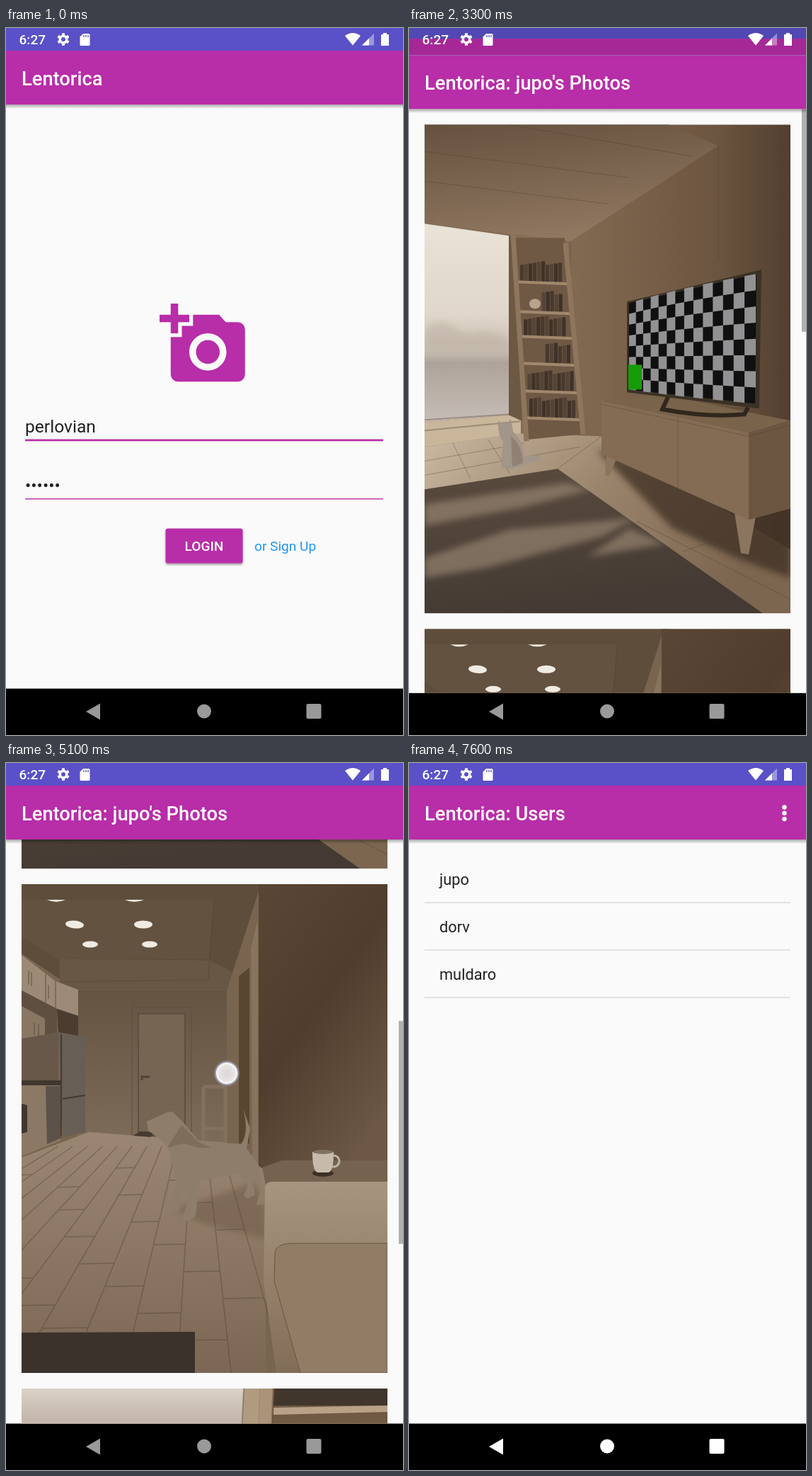
Recreate the animation shown at these times as an HTML page. Size 561 by 998 pixels, loop 8 s.

```html
<!DOCTYPE html>
<html lang="en">
<head>
<meta charset="utf-8">
<title>Photo sharing app</title>
<style>
  html, body { margin: 0; width: 100%; height: 100%; overflow: hidden; background: #000; }
  #stage { display: block; width: 100vw; height: 100vh; font-family: Roboto, sans-serif; }
  .title { font-size: 27.3px; font-weight: 500; fill: #fff; }
  .row { font-size: 21.8px; fill: #212121; }
  .field { font-size: 24.6px; fill: #212121; }
  .small { font-size: 19.1px; }
  .medium { font-weight: 500; fill: #fff; }
  .accent { fill: #b82da8; }
  .line { fill: none; stroke: #49382a; stroke-opacity: .35; }
</style>
</head>
<body>
<svg id="stage" viewBox="0 0 561 998">
  <defs>
    <linearGradient id="shade" x2="0" y2="1"><stop stop-opacity=".32"/><stop offset="1" stop-opacity="0"/></linearGradient>
    <linearGradient id="ceiling" x2=".3" y2="1"><stop stop-color="#66513f"/><stop offset="1" stop-color="#8f7760"/></linearGradient>
    <linearGradient id="wall"><stop offset=".35" stop-color="#856c54"/><stop offset=".8" stop-color="#6c5540"/><stop offset="1" stop-color="#523f2f"/></linearGradient>
    <linearGradient id="floor" x2="1" y2=".5"><stop stop-color="#cbb9a1"/><stop offset=".5" stop-color="#9a846c"/><stop offset="1" stop-color="#7c6650"/></linearGradient>
    <linearGradient id="rug" x2=".3" y2="1"><stop stop-color="#5a4b3e"/><stop offset="1" stop-color="#443a33"/></linearGradient>
    <linearGradient id="glass" x2="0" y2="1">
      <stop stop-color="#e9e2d6"/><stop offset=".45" stop-color="#e0d7ca"/><stop offset=".64" stop-color="#cbc0b3"/>
      <stop offset=".7" stop-color="#aea39a"/><stop offset="1" stop-color="#c6bdb6"/>
    </linearGradient>
    <linearGradient id="backWall" x2="0" y2="1"><stop stop-color="#655442"/><stop offset="1" stop-color="#7e6c5a"/></linearGradient>
    <linearGradient id="darkWall" x2=".6" y2="1"><stop stop-color="#5a4635"/><stop offset=".5" stop-color="#513d2d"/><stop offset="1" stop-color="#6c5845"/></linearGradient>
    <linearGradient id="hallFloor" x2="0" y2="1"><stop stop-color="#9a8672"/><stop offset="1" stop-color="#7c6754"/></linearGradient>
    <linearGradient id="sofa" x2="0" y2="1"><stop stop-color="#a8957f"/><stop offset="1" stop-color="#826d58"/></linearGradient>
    <linearGradient id="wideGlass" x2="0" y2="1">
      <stop stop-color="#dcd2c7"/><stop offset=".22" stop-color="#c3b6ac"/><stop offset=".45" stop-color="#e6ddce"/>
      <stop offset=".65" stop-color="#d8cec3"/><stop offset="1" stop-color="#aaa2a0"/>
    </linearGradient>
    <linearGradient id="shelfWall" x2="0" y2="1"><stop stop-color="#6b553f"/><stop offset="1" stop-color="#8f785d"/></linearGradient>
    <radialGradient id="dot">
      <stop stop-color="#dcd7d6"/><stop offset=".6" stop-color="#e8e5e5"/><stop offset=".76" stop-color="#fbfafc"/>
      <stop offset=".84" stop-color="#a3a2bc" stop-opacity=".8"/><stop offset="1" stop-color="#9090b0" stop-opacity="0"/>
    </radialGradient>
    <filter id="soft"><feGaussianBlur stdDeviation="5"/></filter>
    <filter id="raised" x="-10%" y="-10%" width="120%" height="140%"><feDropShadow dx="0" dy="2" stdDeviation="1.6" flood-opacity=".4"/></filter>
    <clipPath id="reveal"><rect id="revealRect" width="561" height="998"/></clipPath>
    <g id="chrome">
      <rect width="561" height="998" fill="#fafafa"/>
      <rect y="932.5" width="561" height="120"/>
    </g>
    <g id="bar">
      <rect y="108" width="561" height="6" fill="url(#shade)"/>
      <rect width="561" height="32.5" fill="#5a50c8"/>
      <rect class="accent" y="32" width="561" height="76"/>
    </g>
  </defs>

  <rect width="561" height="998"/>

  <g id="login">
    <use href="#chrome"/><use href="#bar"/>
    <text class="title" x="22" y="81">Lentorica</text>
    <path class="accent" transform="translate(217 383.8) scale(5.25)" d="M3 4V1h2v3h3v2H5v3H3V6H0V4h3zm3 6V7h3V4h7l1.83 2H21c1.1 0 2 .9 2 2v12c0 1.1-.9 2-2 2H5c-1.1 0-2-.9-2-2V10h3zm7 9c2.76 0 5-2.24 5-5s-2.24-5-5-5-5 2.24-5 5 2.24 5 5 5zm-3.2-5c0 1.77 1.43 3.2 3.2 3.2s3.2-1.43 3.2-3.2-1.43-3.2-3.2-3.2-3.2 1.43-3.2 3.2z"/>
    <text class="field" x="27" y="571">perlovian</text>
    <rect id="cursor" class="accent" x="132" y="546" width="2.7" height="32"/>
    <rect class="accent" x="27" y="580.5" width="506" height="2.7"/>
    <text class="field" x="27" y="654">••••••</text>
    <rect class="accent" x="27" y="664" width="506" height="1.4"/>
    <rect class="accent" x="225.5" y="706.5" width="109" height="49" rx="3" filter="url(#raised)"/>
    <rect id="buttonPress" x="225.5" y="706.5" width="109" height="49" rx="3" fill="#fff" opacity=".22"/>
    <text class="small medium" x="280" y="738" text-anchor="middle">LOGIN</text>
    <text class="small" x="351" y="738" fill="#2196f3">or Sign Up</text>
  </g>

  <g id="users">
    <use href="#chrome"/><use href="#bar"/>
    <text class="title" x="22" y="81">Lentorica: Users</text>
    <g fill="#fff"><circle cx="530.5" cy="62.5" r="3.2"/><circle cx="530.5" cy="70.8" r="3.2"/><circle cx="530.5" cy="79" r="3.2"/></g>
    <rect id="rowPress" x="22" y="130" width="517" height="67" opacity=".12"/>
    <text class="row" x="43" y="172">jupo</text>
    <text class="row" x="43" y="239">dorv</text>
    <text class="row" x="43" y="306">muldaro</text>
    <path d="M22 197H539M22 264H539M22 331H539" stroke="#dadada" stroke-width="1.5"/>
  </g>

  <g id="photos">
    <use href="#chrome"/>
    <svg y="108" width="561" height="824.5">
      <g id="feed">
        <!-- living room -->
        <svg x="22" y="22" width="517" height="690">
          <rect width="517" height="690" fill="url(#wall)"/>
          <path d="M0 0H345L415 30 206 165 0 139Z" fill="url(#ceiling)"/>
          <path class="line" d="M415 30V190M206 165V440M0 38 290 75M0 80 260 112M120 0 380 45"/>
          <path d="M0 140 119 157V410L0 420Z" fill="url(#glass)"/>
          <path d="M0 290Q20 270 40 285T80 290L119 300V322H0Z" fill="#b9ada0" opacity=".5" filter="url(#soft)"/>
          <path d="M119 157 126 156 138 418 119 410Z" fill="#6d5843"/>
          <path d="M0 420 119 410 136 418V436L0 455Z" fill="#c9b69b"/>
          <path class="line" d="M0 417 120 409M0 432 135 419" stroke-width="2"/>
          <path d="M0 455 135 436 250 440 517 600V690H0Z" fill="url(#floor)"/>
          <path class="line" d="M0 475 140 450M0 495 220 455M40 450 65 500M90 445 120 492M188 486 250 440M300 560 517 670M365 603 400 590 458 607"/>
          <path d="M0 515 188 486 478 690H0Z" fill="url(#rug)"/>
          <path d="M0 536 200 506 236 515 140 540 0 566ZM0 612 120 572 300 555 250 582 90 625 0 640ZM230 610 290 570 340 592Z" fill="#a8957f" opacity=".55" filter="url(#soft)"/>
          <path d="M125 160H198L223 437 143 445Z" fill="#6f5945"/>
          <g id="shelves"></g>
          <path d="M125 155 144 447M199 167 224 437" stroke="#8d765c" stroke-width="7"/>
          <ellipse cx="156" cy="253" rx="8" ry="7" fill="#b7a48c"/>
          <path d="M104 418 109 422H116L122 416 125 433Q141 449 140 468L162 467 164 474 143 480Q120 490 108 483L111 448Q103 438 104 418Z" fill="#a2958a"/>
          <path d="M122 440Q138 452 139 478L124 483Z" fill="#7d6d5d" opacity=".5"/>
          <path d="M242 458 458 540 517 530V640L440 612 350 570Z" fill="#3d2e20" opacity=".75" filter="url(#soft)"/>
          <path d="M257 467 271 472 261 496 255 495ZM438 548 468 553 458 607 447 605Z" fill="#8b755e"/>
          <path d="M250 390 335 381 517 418 458 435Z" fill="#7a634b"/>
          <path d="M250 390 458 435V558L250 465Z" fill="#846c54"/>
          <path d="M458 435 517 418V542L458 558Z" fill="#6c5641"/>
          <path class="line" d="M358 412V513M250 395 458 440 517 424"/>
          <path d="M346 380 336 402Q400 414 452 409L457 399" fill="none" stroke="#30271e" stroke-width="6"/>
          <path d="M286 250 476 205 473 401 286 378Z" fill="#3b3226"/>
          <path d="M289 252 469 211 467 394 288 374Z" fill="#101010"/>
          <path id="checks" fill="#929294"/>
          <path d="M288 339H307V374H288Z" fill="#159c08"/>
        </svg>

        <!-- hallway -->
        <svg x="22" y="734" width="517" height="690">
          <rect width="517" height="690" fill="#78654f"/>
          <path d="M0 0H345L290 150H78L0 98Z" fill="#5f4d3c"/>
          <path d="M0 22H272L264 107H54L0 75Z" fill="#645241"/>
          <path d="M54 104 264 107 300 125 290 152H78L54 138Z" fill="#695745"/>
          <path class="line" d="M272 22 264 135 54 138M54 105 264 107M78 152H290"/>
          <path d="M36 22H62Q49 28 36 22ZM146 22H173Q159 28 146 22Z" fill="#efe9df"/>
          <g fill="#f0ebe2"><ellipse cx="75" cy="57" rx="13" ry="5.5" transform="rotate(5 75 57)"/><ellipse cx="172" cy="57" rx="13" ry="5.5"/><ellipse cx="97" cy="85" rx="11" ry="4.5"/><ellipse cx="181" cy="85" rx="11" ry="4.5"/></g>
          <path d="M78 152H290V370H78Z" fill="url(#backWall)"/>
          <path d="M156 174H240V360H156Z" fill="none" stroke="#5f4e3c"/>
          <path d="M165 183H231V355H165Z" fill="#776553" stroke="#58483a" stroke-width="1.5"/>
          <path d="M170 270V277M170 272H181" stroke="#4f4335" stroke-width="3"/>
          <path d="M290 150 335 10V410L290 366Z" fill="#78644f"/>
          <path d="M307 130 322 118V366H307Z" fill="#594630"/>
          <path d="M324 90 334 50V400H326Z" fill="#88745e"/>
          <path d="M335 0H517V425H335Z" fill="url(#darkWall)"/>
          <path d="M0 100 48 137 80 149V186L50 176 0 150Z" fill="#9c8a76"/>
          <path d="M0 150 50 176V212H0Z" fill="#5f4f40"/>
          <path d="M0 172 33 190V224L0 218Z" fill="#897764"/>
          <path d="M50 176 80 186V214L52 209Z" fill="#4a3d30"/>
          <path d="M0 218 52 209V280H0Z" fill="#67584a"/>
          <path class="line" d="M34 127V168M48 137V176M10 122V142M14 124V144M38 142V162M18 196V213M24 198V215" stroke-width="2"/>
          <path d="M0 284H55V362L0 384Z" fill="#8b7965"/>
          <path d="M0 277H57V284H0ZM0 310 8 312V350L0 352Z" fill="#40372f"/>
          <path d="M34 285H57V358L36 367Z" fill="#5c5249"/>
          <path d="M52 209 90 217V350L59 357Z" fill="#675e55"/>
          <path d="M56 212V355M58 303 90 298" stroke="#433a33" stroke-width="2"/>
          <path d="M0 386 95 350 290 365 345 405V690H0Z" fill="url(#hallFloor)"/>
          <path id="planks" class="line" stroke-width="1.5"/>
          <path d="M157 355 168 349 190 350 182 357Z" fill="#473a2e"/>
          <path d="M257 286H288V364M257 286V364M257 345H288" fill="none" stroke="#84715d" stroke-width="5"/>
          <path d="M215 460 330 420 345 455 345 500 260 480Z" fill="#54412f" opacity=".3" filter="url(#soft)"/>
          <path d="M177 335 206 322 213 321 229 337 250 362 310 367Q322 352 313 317L323 345 318 373 334 395 344 440V452L332 453 338 430 326 414 330 438 320 444 314 440 320 425 305 409 252 418 246 468 236 476 226 473 234 452 230 428 222 461 210 465 213 456 218 418 207 371 193 358 179 348Z" fill="#8e7d6a"/>
          <path d="M206 372 226 340 250 364 268 372 250 372 228 366Z" fill="#6b5947" opacity=".45"/>
          <path d="M0 633 245 632V690H0Z" fill="#3b322c"/>
          <path d="M340 400 368 390H517V425H345Z" fill="#75624f"/>
          <path d="M344 430Q344 420 354 420H517V690H360L342 560Z" fill="url(#sofa)"/>
          <path d="M358 520Q360 508 380 507H517V690H394L357 560Z" fill="#917c66" stroke="#695542"/>
          <ellipse cx="426" cy="408" rx="15" ry="5" fill="#3c3026"/>
          <circle cx="441" cy="391" r="8" fill="none" stroke="#bfb3a4" stroke-width="3"/>
          <path d="M411 378H441Q441 405 434 407H418Q411 405 411 378Z" fill="#c6baab"/>
          <ellipse cx="426" cy="378" rx="14" ry="3" fill="#817363"/>
        </svg>

        <!-- window corner -->
        <svg x="22" y="1446" width="517" height="690">
          <rect width="517" height="690" fill="#9d866b"/>
          <path d="M0 0H314L305 190 0 198Z" fill="url(#wideGlass)"/>
          <path d="M314 0H336L330 210 305 190Z" fill="#b09b80"/>
          <path d="M0 198 305 190 330 200V208L0 217Z" fill="#cbbba0"/>
          <path class="line" d="M314 0 305 190 0 198M0 206 328 197" stroke-width="2"/>
          <path d="M0 214 330 205V210L0 219Z" fill="#8d775d"/>
          <path d="M0 219 330 210V224L0 236Z" fill="#dfd0b7"/>
          <path d="M0 236 330 224V260L0 273Z" fill="#b19a7c"/>
          <path d="M0 273 517 252V690H0Z" fill="url(#floor)"/>
          <path class="line" d="M0 330 517 300M0 410 517 370M0 510 517 460M60 270 30 330M160 266 140 322M260 262 250 316M90 325 50 406M330 311 340 384"/>
          <path d="M0 560 517 510V690H0Z" fill="url(#rug)"/>
          <path d="M350 0H517V258L346 285Z" fill="url(#shelfWall)"/>
          <path d="M358 0H517V24H356Z" fill="#40362c"/>
          <path d="M356 27 517 24V33L356 37ZM351 121 440 114 517 126V138L352 151ZM349 238 517 220V236L349 246Z" fill="#b8a187"/>
          <g id="bigBooks"></g>
          <path d="M337 0H356L344 292H328Z" fill="#aa9378"/>
          <path class="line" d="M356 0 344 292" stroke-width="3"/>
        </svg>
      </g>
      <rect id="scrollbar" x="555" width="6" height="314.6" fill="#b0b0b0"/>
    </svg>
    <use href="#bar"/>
    <text class="title" x="22" y="81">Lentorica: jupo's Photos</text>
  </g>

  <!-- system icons -->
  <g fill="#fff">
    <text class="small medium" x="18.5" y="23">6:27</text>
    <circle cx="81" cy="16" r="4.8" fill="none" stroke="#fff" stroke-width="3.6"/>
    <circle cx="81" cy="16" r="7.2" fill="none" stroke="#fff" stroke-width="3" pathLength="12" stroke-dasharray="1" stroke-dashoffset="1.5"/>
    <path d="M109 8H117Q118.5 8 118.5 9.5V23.5Q118.5 25 117 25H106Q104.5 25 104.5 23.5V12.5Z"/>
    <path d="M110 10V13M113 10V13M116 10V13" stroke="#5a50c8" stroke-width="1.3"/>
    <path d="M479 11Q490 3 501 11L490 24.5Z"/>
    <path d="M520 7.5V24.5H503Z" opacity=".4"/><path d="M513 14.5V24.5H503Z"/>
    <path d="M533 7H538V9H541V25H530V9H533Z"/>
  </g>
  <g id="navIcons">
    <path d="M113 965 133 953.5V976.5Z"/>
    <circle cx="280" cy="964.5" r="10"/>
    <rect x="424.5" y="954" width="21" height="21" rx="2"/>
  </g>
  <circle id="touch" r="19" fill="url(#dot)"/>
</svg>

<script>
const $ = id => document.getElementById(id);
const mix = (a, b, k) => a + (b - a) * k;
const clamp = k => Math.max(0, Math.min(1, k));
const show = (id, on) => $(id).style.display = on ? '' : 'none';

// Piecewise linear track of [time, value] pairs.
function track(keys, t) {
  const i = keys.findIndex(key => key[0] > t);
  if (i < 0) return keys.at(-1)[1];
  if (!i) return keys[0][1];
  const [[t0, a], [t1, b]] = [keys[i - 1], keys[i]];
  return mix(a, b, (t - t0) / (t1 - t0));
}

// y at x on a cubic curve whose x coordinate rises steadily.
function bezier(x, xs, ys) {
  const at = ([a, b, c, d], s) =>
    a * (1 - s) ** 3 + 3 * b * s * (1 - s) ** 2 + 3 * c * s * s * (1 - s) + d * s ** 3;
  let low = 0, high = 1;
  for (let i = 0; i < 24; i++) {
    const mid = (low + high) / 2;
    if (at(xs, mid) < x) low = mid; else high = mid;
  }
  return at(ys, low);
}
const slideEase = x => bezier(x, [0, .4, .2, 1], [0, 0, 1, 1]);
const revealEase = x => x < 1 / 6
  ? bezier(x, [0, .05, .1333, .1667], [0, 0, .06, .4])
  : bezier(x, [.1667, .2083, .25, 1], [.4, .82, 1, 1]);

function buildDetails() {
  // Columns widen towards the near side of the tilted screen.
  const corner = (u, v) =>
    `${mix(289, 468, u * (.74 + .26 * u))} ${mix(mix(252, 211, u), mix(374, 394, u), v)}`;
  const cols = 14, rows = 8;
  let checks = '';
  for (let c = 0; c < cols; c++) for (let r = (c + 1) % 2; r < rows; r += 2) {
    const [u, w, v, z] = [c / cols, (c + 1) / cols, r / rows, (r + 1) / rows];
    checks += `M${corner(u, v)}L${corner(w, v)} ${corner(w, z)} ${corner(u, z)}Z`;
  }
  $('checks').setAttribute('d', checks);

  const book = (x, y, w, h, fill) => `<rect x="${x}" y="${y}" width="${w}" height="${h}" fill="${fill}"/>`;
  let shelves = '';
  [222, 264, 299, 337, 376, 414].forEach((y, row) => {
    const left = 129 + row * 2.6, right = 204 + row * 4;
    const first = row === 1 || row === 3 ? left + 34 : left + 6;
    for (let x = first, i = 0; x < right - 14; x += 6, i++) {
      const h = 24 + (i * 7 + row * 3) % 6;
      shelves += book(x, y - h, 5.2, h, ['#48392d', '#544336', '#3f3228'][(i + row) % 3]);
    }
    shelves += `<path d="M${left} ${y}L${right} ${y + 3}" stroke="#a1886c" stroke-width="4"/>`;
  });
  $('shelves').innerHTML = shelves;

  let big = '';
  for (let i = 0; i < 6; i++)
    big += `<g transform="translate(${426 + i * 17} 50) skewX(-9)">${book(0, i % 3 * 3, 15, 82, ['#5c5146', '#847666', '#6d6051'][i % 3])}</g>`;
  for (let i = 0; i < 11; i++)
    big += `<g transform="translate(${359 + i * 14} 149) skewX(-5)">${book(0, i * 5 % 8, 12.5, 84 - i * 1.5 - i * 5 % 8, ['#84705b', '#92806c', '#716050'][i % 3])}</g>`;
  $('bigBooks').innerHTML = big;

  // Floorboards fan out from a distant point, with staggered end joints.
  const seam = (i, y) => mix(248, 296 - 76 * i, (y - 248) / 442);
  let planks = '';
  for (let i = -1; i < 11; i++) {
    planks += `M${seam(i, 370)} 370L${seam(i, 690)} 690`;
    for (let k = 0; k < 3; k++) {
      const y = 390 + (k * 97 + (i + 1) * 59) % 285;
      planks += `M${seam(i, y)} ${y}L${seam(i + 1, y)} ${y + 1}`;
    }
  }
  $('planks').setAttribute('d', planks);
}

const LOOP = 8000, STEP = 100, SLIDE = 425;
const transitions = [
  { start: 1480, upper: 'users', lower: 'login', opening: true },
  { start: 3060, upper: 'photos', lower: 'users', opening: true },
  { start: 7080, upper: 'photos', lower: 'users', opening: false },
];
const scrollKeys = [[4000, 0], [4400, 253], [4600, 390], [4800, 462], [4900, 490], [5100, 671],
  [5300, 808], [5500, 876], [5700, 909], [5800, 914], [6000, 914], [6200, 1110], [6350, 1265], [6500, 1334]];
const touches = [
  { from: 900, to: 1200, x: 290, y: [[0, 733]] },
  { from: 2600, to: 2900, x: 290, y: [[0, 165]] },
  { from: 4000, to: 4600, x: 315, y: [[4000, 640], [4400, 374], [4600, 237]] },
  { from: 4900, to: 5300, x: 312, y: [[4900, 632], [5100, 438], [5300, 301]] },
  { from: 6000, to: 6300, x: 312, y: [[6000, 640], [6300, 350]] },
  { from: 6800, to: 7000, x: 123, y: [[0, 965]] },
];

function place(id, y, opacity, clipped) {
  const win = $(id);
  show(id, true);
  win.setAttribute('transform', `translate(0 ${y})`);
  win.setAttribute('opacity', opacity);
  if (clipped) win.setAttribute('clip-path', 'url(#reveal)');
  else win.removeAttribute('clip-path');
}

function drawWindows(t) {
  for (const id of ['login', 'users', 'photos']) show(id, false);
  const current = transitions.findLast(tr => t >= tr.start);
  if (!current) return place('login', 0, 1);
  const { start, upper, lower, opening } = current;
  const p = (t - start) / SLIDE;
  if (p >= 1) return place(opening ? upper : lower, 0, 1);
  const directed = k => opening ? k : 1 - k;
  const slide = directed(slideEase(p));
  $('revealRect').setAttribute('y', 957 * (1 - directed(revealEase(p))));
  place(lower, -20 * slide, 1 - .1 * directed(clamp(p * 3.6)));
  place(upper, 41 * (1 - slide), 1, true);
}

function render(t) {
  drawWindows(t);
  show('cursor', t >= 400 && t < 900);
  show('buttonPress', t >= 900 && t < 1300);
  show('rowPress', t >= 2600 && t < 3100);

  const scroll = track(scrollKeys, t);
  $('feed').setAttribute('transform', `translate(0 ${-scroll})`);
  $('scrollbar').setAttribute('y', scroll * 824 / 2158);
  $('scrollbar').setAttribute('opacity', 1 - clamp((t - 6750) / 250));
  $('navIcons').setAttribute('fill', t < 6800 ? '#999' : '#fff');

  const touch = touches.find(({ from, to }) => t >= from && t < to);
  show('touch', touch);
  if (touch) {
    $('touch').setAttribute('cx', touch.x);
    $('touch').setAttribute('cy', track(touch.y, t));
  }
}

buildDetails();
const origin = performance.now();
function tick() {
  // The picture advances ten times a second.
  const t = (performance.now() - origin) % LOOP;
  render(Math.floor(t / STEP) * STEP);
  requestAnimationFrame(tick);
}
tick();
</script>
</body>
</html>
```
